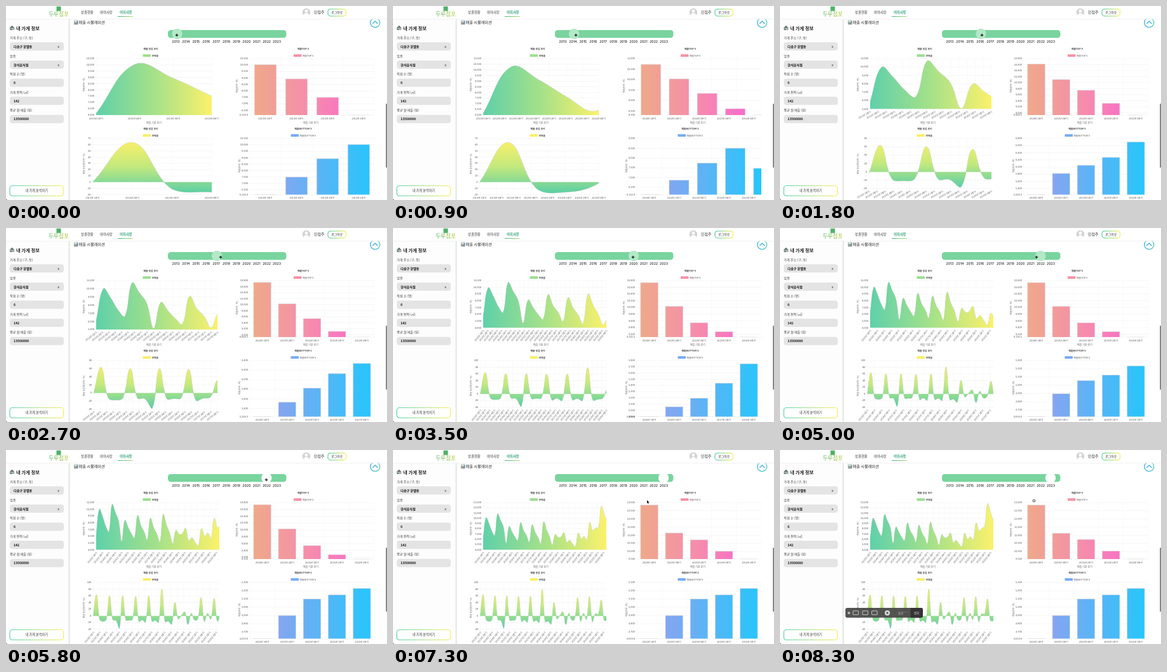
Write an HTML page with a canvas that moves like this. It is 600 by 306 pixels and loops after 8400 ms.

```html
<!DOCTYPE html>
<html lang="ko">
<head>
<meta charset="utf-8">
<style>
html, body { margin: 0; width: 100%; height: 100%; overflow: hidden; background: #fff; }
canvas { display: block; width: 600px; height: 306px; }
</style>
</head>
<body>
<canvas id="stage"></canvas>
<script>
const LOOP = 8400;
const KR = '"Noto Sans CJK KR", "Noto Sans CJK JP", "Noto Sans CJK", sans-serif';
const AR = '"Liberation Sans", Arial, sans-serif';
const canvas = document.getElementById('stage');
const c = canvas.getContext('2d');
const dpr = window.devicePixelRatio || 1;
canvas.width = 600 * dpr;
canvas.height = 306 * dpr;

// Quarterly sales, one row per year from 2013
const sales = [
  [6134.9, 10030, 8928.5, 7500], [6700, 10740, 9540, 8300], [5228.3, 8380, 7350, 6420],
  [5750, 9116.5, 7600, 6700], [5450, 8700, 7300, 6350], [5150, 9275, 7700, 6500],
  [4899.6, 6900, 6300, 6400], [7200, 5360, 5800, 5100], [4619.6, 7160, 6000, 6500],
  [5800, 9150, 7600, 8100], [8500, 12850, 11120, 9500]
];
const updateTimes = [0, 750, 1360, 1790, 2530, 2950, 3350, 3830, 4750, 5350, 6800];
const cursorPath = [
  [0, 269, 46], [500, 272, 46], [1100, 296, 46], [1800, 318, 46], [2700, 338, 46],
  [3500, 378, 46], [4300, 379, 46], [5000, 404, 46], [5800, 410, 47], [6100, 411, 47],
  [6500, 425, 46], [6700, 425, 46], [7200, 400, 80], [LOOP, 400, 80]
];

const lerp = (a, b, p) => a + (b - a) * p;
const easeOutQuart = p => 1 - (1 - Math.min(1, p)) ** 4;

// ---------- drawing helpers ----------
function text(s, x, y, size, { color = '#333', weight = 400, align = 'left', font = KR, angle = 0 } = {}) {
  c.save();
  c.translate(x, y);
  c.rotate(angle);
  c.font = `${weight} ${size}px ${font}`;
  c.fillStyle = color;
  c.textAlign = align;
  c.textBaseline = 'middle';
  c.fillText(s, 0, 0);
  c.restore();
}
function box(x, y, w, h, r, fill, stroke, width = 1) {
  c.beginPath();
  c.roundRect(x, y, w, h, r);
  if (fill) { c.fillStyle = fill; c.fill(); }
  if (stroke) { c.strokeStyle = stroke; c.lineWidth = width; c.stroke(); }
}
function disc(x, y, r, fill) {
  c.beginPath();
  c.arc(x, y, r, 0, 7);
  c.fillStyle = fill;
  c.fill();
}
function path(points, color, width) {
  c.beginPath();
  points.forEach(p => c.lineTo(...p));
  c.strokeStyle = color;
  c.lineWidth = width;
  c.stroke();
}
function gradient(x0, y0, x1, y1, ...colors) {
  const g = c.createLinearGradient(x0, y0, x1, y1);
  colors.forEach((color, i) => g.addColorStop(i / (colors.length - 1), color));
  return g;
}

// ---------- chart model ----------
const quarterLabel = i => `${2013 + (i >> 2)}년 ${i % 4 + 1}분기`;
const LABEL_WIDTH = 22;
function niceStep(raw) {
  const unit = 10 ** Math.floor(Math.log10(raw));
  return [1, 2, 5, 10].find(n => raw / unit <= n) * unit;
}
function makeAxis(values, keepMin) {
  const min = Math.min(...values), max = Math.max(...values);
  let step = niceStep((max - min) / 10);
  const spaces = Math.ceil(max / step) - Math.floor(min / step);
  if (spaces > 10) step = niceStep(spaces * step / 10);
  const hi = Math.ceil(max / step) * step;
  const lo = keepMin ? min : Math.floor(min / step) * step;
  const ticks = [lo];
  for (let v = (Math.floor(lo / step) + 1) * step; v <= hi; v += step) ticks.push(v);
  return { lo, hi, ticks };
}
function withScale(state) {
  const { axis, top, bottom } = state;
  state.toY = v => lerp(bottom, top, (v - axis.lo) / (axis.hi - axis.lo));
  state.ys = state.values.map(state.toY);
  return state;
}
// Labels that do not fit side by side tilt, up to 50 degrees
function labelTilt(spacing) {
  return spacing > LABEL_WIDTH ? 0 : Math.min(50 * Math.PI / 180, Math.asin(Math.min(1, 6 / spacing)));
}
function lineState(year, growth) {
  const flat = sales.slice(0, year + 1).flat();
  const values = growth ? flat.map((v, i) => i ? (v / flat[i - 1] - 1) * 100 : 0) : flat;
  const right = year < 2 ? 324 : year < 5 ? 333 : 336;
  const tilt = labelTilt((right - 142) / (values.length - 1));
  const tilted = tilt > 0;
  const growthLeft = tilted ? Math.max(137.3, 120.5 + LABEL_WIDTH * Math.cos(tilt)) : 136.5;
  const left = growth ? growthLeft : 142;
  const drop = tilted ? 1.4 + 17.2 * Math.sin(tilt) : 0;
  const state = withScale({
    values, left, right, top: growth ? 209 : 83, bottom: (growth ? 297.5 : 172) - drop,
    axis: makeAxis(values), dx: (right - left) / (values.length - 1),
    labels: values.map((_, i) => quarterLabel(i)), angle: -tilt
  });
  state.base = state.toY(Math.max(state.axis.lo, 0));
  return state;
}
function barState(year, lowest) {
  const ranked = sales.slice(0, year + 1).flat().map((v, i) => ({ v, i }))
    .sort((a, b) => lowest ? a.v - b.v : b.v - a.v).slice(0, 5);
  const values = ranked.map(r => r.v);
  const left = 384, right = 580, bottom = lowest ? 297.5 : 172;
  return withScale({
    values, left, right, bottom, top: lowest ? 209 : 83, base: bottom,
    axis: makeAxis(values, true), dx: (right - left) / values.length,
    labels: ranked.map(r => quarterLabel(r.i)), angle: 0
  });
}
const allYears = build => sales.map((_, year) => build(year));
const charts = {
  total: allYears(y => lineState(y, false)),
  growth: allYears(y => lineState(y, true)),
  best: allYears(y => barState(y, false)),
  worst: allYears(y => barState(y, true))
};

// Axes switch at once; points ease from wherever they were
function poseAt(states, t) {
  let pose = states[0];
  for (let k = 1; k < states.length && t >= updateTimes[k]; k++) {
    const p = easeOutQuart((t - updateTimes[k]) / 1000), prev = pose, next = states[k];
    pose = {
      ...next,
      drawDx: lerp(prev.drawDx ?? prev.dx, next.dx, p),
      drawYs: next.ys.map((y, i) => lerp((prev.drawYs ?? prev.ys)[i] ?? next.base, y, p))
    };
  }
  return { drawDx: pose.dx, drawYs: pose.ys, ...pose };
}

// ---------- chart drawing ----------
function drawFrame(s, isBar) {
  const count = s.labels.length;
  for (const v of s.axis.ticks) {
    const y = s.toY(v);
    path([[s.left - 2, y], [s.right, y]], '#ececec', 0.5);
    const label = v.toLocaleString('en-US', { maximumFractionDigits: 1 });
    text(label, s.left - 3, y, 4, { align: 'right', color: '#555', font: AR });
  }
  const skip = isBar ? 1 : Math.ceil(6.5 / s.dx);
  for (let i = 0; i < count + (isBar ? 1 : 0); i += skip) {
    const x = s.left + i * s.dx;
    path([[x, s.top], [x, s.bottom + 2]], '#f5f5f5', 0.5);
    if (i === count) break;
    if (s.angle) text(s.labels[i], x + 1, s.bottom + 4, 3.8, { align: 'right', color: '#555', angle: s.angle });
    else text(s.labels[i], x + (isBar ? s.dx / 2 : 0), s.bottom + 5.5, 3.8, { align: 'center', color: '#555' });
  }
}
function traceSpline(pts, top, bottom) {
  const clamp = y => Math.max(top, Math.min(bottom, y));
  const controls = pts.map((p, i) => {
    const a = pts[i - 1] ?? p, b = pts[i + 1] ?? p;
    const da = Math.hypot(p[0] - a[0], p[1] - a[1]), db = Math.hypot(b[0] - p[0], b[1] - p[1]);
    const fa = 0.4 * da / (da + db), fb = 0.4 * db / (da + db);
    const shift = f => [p[0] + f * (b[0] - a[0]), clamp(p[1] + f * (b[1] - a[1]))];
    return [shift(-fa), shift(fb)];
  });
  c.moveTo(...pts[0]);
  for (let i = 1; i < pts.length; i++) c.bezierCurveTo(...controls[i - 1][1], ...controls[i][0], ...pts[i]);
}
function drawLine(s, fill) {
  drawFrame(s, false);
  const pts = s.drawYs.map((y, i) => [s.left + i * s.drawDx, y]);
  c.save();
  c.beginPath();
  c.rect(s.left, s.top, s.right - s.left, s.bottom - s.top);
  c.clip();
  c.beginPath();
  traceSpline(pts, s.top, s.bottom);
  c.strokeStyle = '#c4cbc2';
  c.lineWidth = 0.9;
  c.stroke();
  c.lineTo(pts.at(-1)[0], s.base);
  c.lineTo(s.left, s.base);
  c.fillStyle = fill;
  c.fill();
  c.restore();
}
function drawBars(s, fill) {
  drawFrame(s, true);
  const w = s.drawDx * 0.7;
  c.save();
  c.beginPath();
  c.rect(s.left, s.top, s.right - s.left, s.bottom - s.top + 0.5);
  c.clip();
  s.drawYs.forEach((y, i) => {
    const x = s.left + (i + 0.5) * s.drawDx - w / 2;
    c.fillStyle = fill;
    c.fillRect(x, y, w, s.bottom - y);
    path([[x, s.bottom], [x, y], [x + w, y], [x + w, s.bottom]], '#d9d4dc', 0.6);
  });
  c.restore();
}
function legend(title, label, x, y, boxX, fill) {
  text(title, x, y, 3.9, { weight: 700, align: 'center', color: '#444' });
  c.fillStyle = fill;
  c.fillRect(boxX, y + 8.2, 12.5, 4);
  text(label, boxX + 14, y + 10.3, 3.8, { color: '#555', weight: label === '연매출' ? 700 : 400 });
}
function drawCharts(t) {
  const total = poseAt(charts.total, t), growth = poseAt(charts.growth, t);
  const green = gradient(total.left, 0, total.right, 0, '#5fd0aa', '#a5e189', '#fbf16b');
  const vertical = gradient(0, 209, 0, growth.bottom, '#fff066', '#c3e97d', '#55cda8');
  const pink = gradient(384, 0, 580, 0, '#eeab88', '#f68bad', '#fa60d4');
  const blue = gradient(384, 0, 580, 0, '#a59aee', '#61b2f4', '#25c6fc');

  legend('매출 증감 추이', '연매출', 228, 68, 215.5, green);
  legend('매출 증감 추이', '연매출', 228, 194, 215.5, '#f9ee68');
  legend('매출TOP 5', '매출TOP 5', 468, 68, 453, pink);
  legend('매출BOTTOM 5', '매출BOTTOM 5', 468, 194, 448.5, blue);

  drawLine(total, green);
  drawLine(growth, vertical);
  drawBars(poseAt(charts.best, t), pink);
  drawBars(poseAt(charts.worst, t), blue);

  const small = { align: 'center', color: '#666' }, up = { ...small, angle: -Math.PI / 2 };
  text('매출 기준 분기', 233, 184.5, 4, small);
  text('매출 기준 분기', 480, 184.5, 4, small);
  text('매출(단위 : 만)', 122.5, 124, 3.6, up);
  text('매출 증감량(단위 : %)', 122.5, 249, 3.6, up);
  text('매출(단위 : 만)', 364, 126, 3.6, up);
  text('매출(단위 : 만)', 367.5, 252, 3.6, up);
}

// ---------- page ----------
function shopIcon(x, y) {
  c.fillStyle = '#65736f';
  c.beginPath();
  c.moveTo(x - 4, y);
  c.lineTo(x, y - 3.7);
  c.lineTo(x + 4, y);
  c.fill();
  c.fillRect(x - 3.3, y, 6.6, 3.4);
  c.fillStyle = '#d8e4dd';
  c.fillRect(x - 2, y + 0.4, 1.6, 1.5);
  c.fillRect(x + 0.6, y + 0.4, 1.6, 3);
}
function chartIcon(x, y) {
  box(x - 3.2, y - 3.2, 6.4, 6.4, 0.5, '#e4e9e6', '#8b9a94', 0.5);
  [['#4f9e68', 4], ['#c8574d', 2.8], ['#3f78b5', 5]].forEach(([color, h], i) => {
    c.fillStyle = color;
    c.fillRect(x - 2.5 + i * 1.8, y + 2.8 - h, 1.4, h);
  });
}
function gradientButton(label, x, y, w, h, size) {
  box(x, y, w, h, 4, '#fff', gradient(x, 0, x + w, 0, '#5dd0b0', '#a8e28a', '#f7ee5c'), 1.2);
  text(label, x + w / 2, y + h / 2, size, { align: 'center', weight: 500 });
}
function drawSidebar() {
  c.fillStyle = '#fdfdfd';
  c.fillRect(0, 20, 98, 286);
  c.fillStyle = '#e2e4e4';
  c.fillRect(98.5, 20, 2, 286);
  shopIcon(9.5, 34.5);
  text('내 가게 정보', 16, 34.8, 7.3, { weight: 700, color: '#222' });
  const fields = [
    ['가게 주소 (구, 동)', '다솜구 한별동', true], ['업종', '한식음식점', true],
    ['직원 수 (명)', '6'], ['가게 면적 (㎡)', '142'], ['평균 월 매출 (원)', '13500000']
  ];
  fields.forEach(([label, value, clearable], i) => {
    const y = 50 + i * 28.6;
    text(label, 6, y, 5.1, { color: '#444' });
    box(6, y + 7.3, 85, 13, 4, '#e4e4e4');
    text(value, 12, y + 14, 5.1, { weight: 700, color: '#111' });
    if (clearable) text('x', 82.5, y + 14, 5.5, { align: 'center', color: '#222' });
  });
  gradientButton('내 가게 분석하기', 6, 283.5, 84.5, 16, 5.2);
}
function drawScrollButton() {
  box(573.8, 18.7, 15, 15, 7.5, '#fff', gradient(574, 0, 589, 0, '#3fa9e8', '#54cdbb'), 1.3);
  path([[577.2, 28], [581.3, 23.9], [585.4, 28]], '#45b5da', 1.4);
}
function drawHeader() {
  c.fillStyle = gradient(0, 19, 0, 23, '#e3e3e3', '#ffffff00');
  c.fillRect(0, 19, 600, 4);
  c.fillStyle = '#fff';
  c.fillRect(0, 0, 600, 20);
  c.fillStyle = '#4fb267';
  c.fillRect(79.5, 0.8, 7, 7);
  text('두루점포', 83, 12.7, 8.6, { align: 'center', weight: 500, color: gradient(-16, 0, 16, 0, '#4fb267', '#b8c934') });
  text('상권현황', 118, 10, 5.3, { weight: 500 });
  text('아마사장', 148, 10, 5.3, { weight: 500 });
  text('이미사장', 179, 10, 5.3, { weight: 700, color: '#36a57c' });
  c.fillStyle = gradient(176, 0, 200, 0, '#4dbb91', '#b9e07c');
  c.fillRect(176, 16, 24, 1.1);
  c.save();
  c.beginPath();
  c.arc(473, 10, 6.5, 0, 7);
  c.clip();
  disc(473, 10, 6.5, '#d3d3d3');
  disc(473, 8, 2.4, '#fff');
  disc(473, 15.6, 4.5, '#fff');
  c.restore();
  text('민점주', 485, 10, 6, { weight: 500 });
  gradientButton('로그아웃', 507, 4.8, 28.5, 11, 4.9);
}
function cursorAt(t) {
  const i = cursorPath.findIndex(p => p[0] > t);
  const a = cursorPath[i - 1], b = cursorPath[i], p = (t - a[0]) / (b[0] - a[0]);
  return [lerp(a[1], b[1], p), lerp(a[2], b[2], p)];
}
function drawSlider(t) {
  box(255, 38, 186.5, 12.3, 4.5, '#79d49e');
  const step = Math.round((cursorAt(Math.min(t, 6600))[0] - 269.5) / 15.65);
  disc(269.5 + step * 15.65, 44, 8.2, t < 5400 ? '#b2e9c7' : '#fff');
  for (let i = 0; i < 11; i++) {
    text(String(2013 + i), 267.5 + i * 15.9, 56.7, 5.2, { align: 'center', weight: 500, color: '#222', font: `Inter, ${AR}` });
  }
}
function drawCursor(t) {
  const [x, y] = cursorAt(t);
  if (t < 6700) {
    path([[x - 2.3, y], [x + 2.3, y]], '#111', 1.2);
    path([[x, y - 2.3], [x, y + 2.3]], '#111', 1.2);
  } else if (t < 8200) {
    c.beginPath();
    [[0, -1], [0, 4.3], [1.2, 3.3], [2, 5], [2.8, 4.6], [2, 3], [3.6, 2.8]].forEach(p => c.lineTo(x + p[0], y + p[1]));
    c.closePath();
    c.fillStyle = '#111';
    c.fill();
  } else {
    disc(x, y, 2.5, '#8b8683');
    disc(x, y, 1.2, '#d4cfcb');
  }
}
function drawRecorder() {
  box(103, 249, 122, 15.5, 3, 'rgba(72,72,70,.93)');
  box(205.5, 249, 19.5, 15.5, [0, 3, 3, 0], '#343434');
  disc(108.5, 257, 2, '#bbb');
  [115, 130, 144.5].forEach(x => box(x, 253.8, 8.5, 6, 0.5, null, '#d5d5d5', 0.9));
  [127, 160, 178].forEach(x => path([[x, 252], [x, 262]], '#6b6b6b', 0.5));
  disc(169, 257, 4, '#ddd');
  box(167.6, 255.6, 2.8, 2.8, 0.3, '#555');
  text('옵션 ﹀', 193, 257, 4.6, { align: 'center', color: '#bbb' });
  text('캡처', 215, 257, 4.6, { align: 'center', color: '#ddd' });
}

function draw(t) {
  c.setTransform(dpr, 0, 0, dpr, 0, 0);
  c.fillStyle = '#fff';
  c.fillRect(0, 0, 600, 306);
  drawCharts(t);
  drawSidebar();
  drawScrollButton();
  drawHeader();
  chartIcon(110.3, 26);
  text('매출 시뮬레이션', 114.5, 26, 6.2, { weight: 500, color: '#222' });
  drawSlider(t);

  box(598.3, 154, 1.7, 101, 0.8, '#777');
  c.fillStyle = '#222';
  c.beginPath();
  c.moveTo(0, 303.5);
  c.quadraticCurveTo(0, 306, 2.5, 306);
  c.lineTo(0, 306);
  c.fill();

  if (t >= 8200) drawRecorder();
  drawCursor(t);
}
function tick() {
  draw(performance.now() % LOOP);
  requestAnimationFrame(tick);
}
tick();
</script>
</body>
</html>
```
